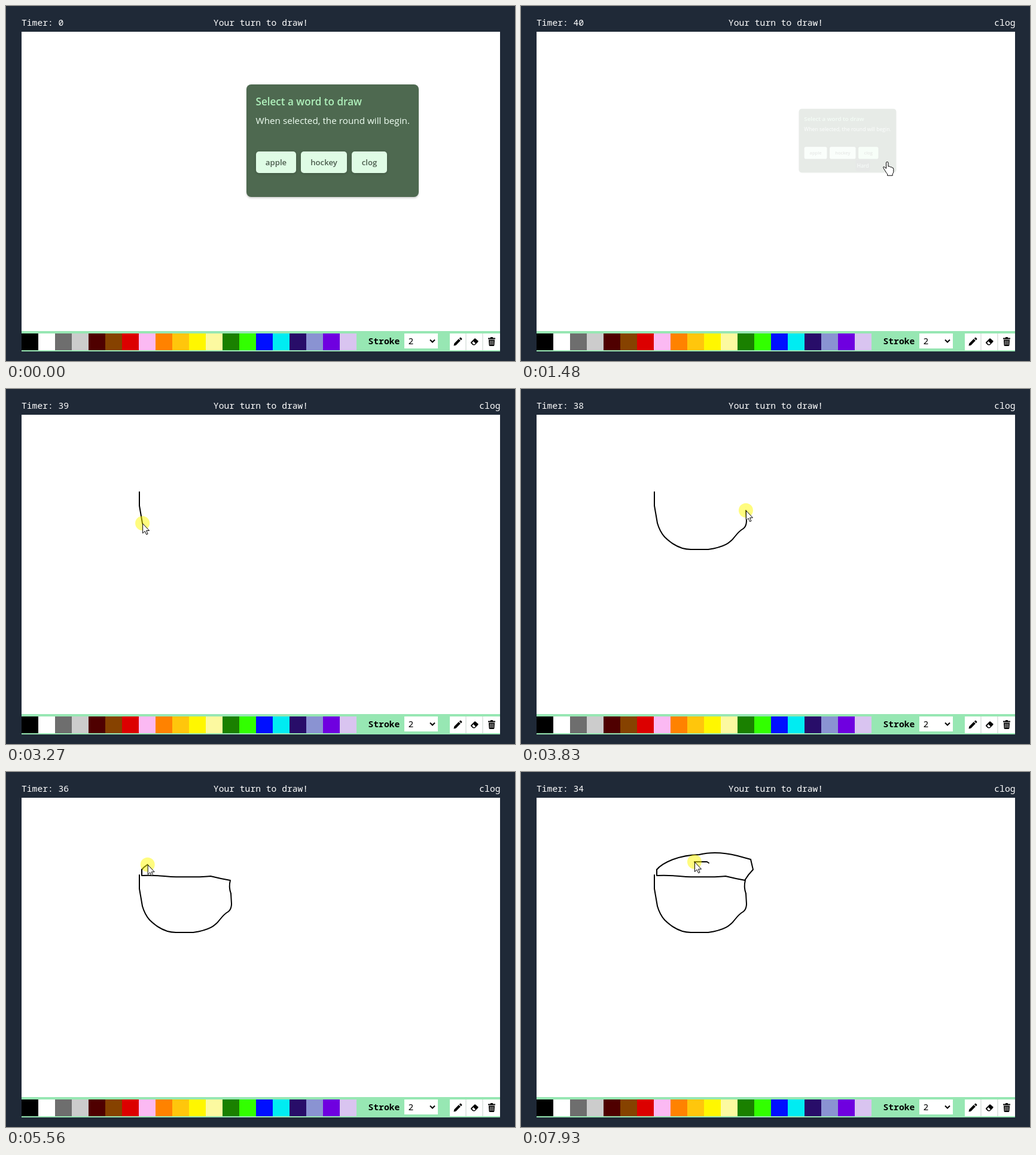
Animation, 851 px wide and 593 px high, one loop 8 s. Source, as an HTML page:

```html
<!DOCTYPE html>
<html lang="en">
<head>
<meta charset="utf-8">
<title>Drawing game</title>
<style>
  html, body { margin: 0; width: 100%; height: 100%; overflow: hidden; background: #1f2937; }
  svg { display: block; width: 851px; height: 593px; }
  text { white-space: pre; }
  .mono { font: 14.67px "Noto Sans Mono", monospace; }
  .head { fill: #fff; font-weight: 500; }
  .bold { font-weight: 700; }
  .sans { font: 15.28px "Open Sans", sans-serif; }
  .title { font-size: 17.1px; font-weight: 600; }
  .word { font-size: 13.2px; font-weight: 600; text-anchor: middle; fill: #4a5b4c; }
  .panel { filter: drop-shadow(0 2px 1.5px rgba(0, 0, 0, .18)); }
  .button { fill: #dffce5; filter: drop-shadow(0 1px 2px rgba(0, 0, 0, .2)); }
  .button.hover { fill: #c9fbcb; }
  #ink path { fill: none; stroke: #000; stroke-width: 2; stroke-linejoin: round; stroke-linecap: round; }
  .cursor { fill: #fff; stroke: #000; stroke-linejoin: round; }
</style>
</head>
<body>
<svg viewBox="0 0 851 593">
  <g class="mono head">
    <text id="timer" x="26" y="33"></text>
    <text x="426" y="33" text-anchor="middle">Your turn to draw!</text>
    <text id="answer" x="826.5" y="33" text-anchor="end">clog</text>
  </g>
  <rect x="26" y="43" width="800" height="500" fill="#fff"/>

  <rect x="26" y="543" width="800" height="34" fill="#97e7b3"/>
  <g id="swatches"></g>
  <text class="mono bold" x="605.5" y="565">Stroke</text>
  <rect x="666" y="547" width="56" height="25" fill="#fff"/>
  <text class="mono" x="672.5" y="565">2</text>
  <path d="M709 557.5l4 4 4-4" fill="none" stroke="#000" stroke-width="2"/>
  <rect x="742" y="547" width="84" height="28" fill="#fff"/>
  <path d="M769 547v28M797 547v28" stroke="#e3e8e5" stroke-width="2"/>
  <path d="M748.5 567.5l.8-3.8 7.6-7.6 3 3-7.6 7.6zM757.8 555.2l1.3-1.3q.8-.6 1.6 0l1.4 1.4q.6.8 0 1.6l-1.3 1.3z"/>
  <path d="M777.3 561.5l6-6q.8-.7 1.6 0l4.4 3.8q.8.8 0 1.6l-5.5 5.6h-3.2l-3.3-3.2q-.7-.8 0-1.8z"/>
  <path d="M779.1 562.4l2.4-2.3 3.4 3.4-1.3 1.4h-2.2z" fill="#fff"/>
  <path d="M806 554.5h3.5l1-1.5h3l1 1.5h3.5v2h-12zM807 557.5h10l-.6 9.3q-.2 1.2-1.4 1.2h-6q-1.2 0-1.4-1.2z"/>
  <path d="M809.7 559v7M812 559v7M814.3 559v7" stroke="#fff" stroke-width=".8"/>

  <g id="dialog" class="sans">
    <rect class="panel" x="402" y="131" width="288" height="188" rx="8" fill="#4e6950"/>
    <text class="title" x="417.5" y="166" fill="#aff0bb">Select a word to draw</text>
    <text x="417.5" y="197" fill="#f0fff3">When selected, the round will begin.</text>
    <g id="buttons"></g>
    <g id="tip">
      <rect y="281" height="34" rx="6" fill="#43524f"/>
      <text y="304" fill="#dcfce7"></text>
    </g>
  </g>

  <g id="ink"></g>
  <g id="pointer">
    <circle id="press" r="12" fill="#fffa00" fill-opacity=".5"/>
    <path id="arrow" class="cursor" d="M.5.5V16.6L4.1 13.1 6.6 18.7 9 17.7 6.6 12.2H11.5Z"/>
    <path id="hand" class="cursor" d="M-1.5 11.4V2a1.7 1.7 0 0 1 3.4 0V8q3-.8 3.4 1 3-.6 3.2 1.2 2.2-.2 2.2 2v4.5q0 2-1.6 4v2.5H.5v-2.5q-1.5-1.5-4-5.8-2.5-3.5-3-5.5.2-2.4 5 2z"/>
  </g>
</svg>
<script>
const LOOP = 8000, CLOSE = 1140;
const $ = id => document.getElementById(id);
const show = (el, on) => el.style.display = on ? '' : 'none';

const colors = '000 fff 6e6e6e ccc 4f0000 864200 dc0000 fbb9f3 ff8200 ffc60c fff700 fcf9a0 1a8000 32ff00 000fff 00ecf2 280d69 8a93d2 6f00e0 d9c4f0'.split(' ');
$('swatches').innerHTML = colors.map((c, i) =>
  `<rect x="${26 + 28 * i}" y="547" width="28" height="28" fill="#${c}"/>`).join('');

const words = [
  { word: 'apple', level: 'Easy', x: 418, w: 67 },
  { word: 'hockey', level: 'Medium', x: 493, w: 77 },
  { word: 'clog', level: 'Hard', x: 578, w: 59 }
];
$('buttons').innerHTML = words.map(b =>
  `<rect class="button" x="${b.x}" y="243" width="${b.w}" height="36" rx="5"/>
   <text class="word" x="${b.x + b.w / 2}" y="266">${b.word}</text>`).join('');
const buttons = document.querySelectorAll('.button');

// Each leg of the pointer's way lasts until the next one starts
const legs = [
  { start: 70, d: 'M722 440L640 330Q580 262 555 262' },
  { start: 400, d: 'M555 262L612 260' },
  { start: 560, d: 'M612 260h.1' },
  { start: 1690, d: 'M612 260L590 268' },
  { start: 1760, d: 'M590 268h.1' },
  { start: 1900, d: 'M590 268C475 305 300 280 215 374L222 172' },
  { start: 2730, d: 'M222 172h1' },
  { start: 3060, draw: true, d: 'M223 172V195L228 224' },
  { start: 3270, draw: true, d: 'M228 224Q232 238 240 247C252 259 266 268 284 268H313C340 264 350 257 358 246Q365 237 372 233 377 229 377 220L376 203' },
  { start: 3830, draw: true, d: 'M376 203Q372 192 375 181 358 178 342 174 328 176 276 175' },
  { start: 4520, draw: true, d: 'M276 175Q250 172 227 173V163' },
  { start: 5490, draw: true, d: 'M227 163C236 152 262 139 298 138Q326 131 362 140L384 146' },
  { start: 6400, draw: true, d: 'M384 146L388 163Q380 171 374 181' },
  { start: 7200, d: 'M374 181Q340 325 316 165L314 152' },
  { start: 7800, draw: true, d: 'M314 152l-3-2H290' },
  { start: 7930, draw: true, d: 'M290 150h.1' }
];
legs.forEach((leg, i) => {
  leg.end = i + 1 < legs.length ? legs[i + 1].start : LOOP;
  leg.path = document.createElementNS('http://www.w3.org/2000/svg', 'path');
  leg.path.setAttribute('d', leg.d);
  leg.length = leg.path.getTotalLength();
  if (leg.draw) $('ink').append(leg.path);
});

const clamp = x => Math.min(1, Math.max(0, x));
const reached = (leg, t) => leg.length * clamp((t - leg.start) / (leg.end - leg.start));

function drawDialog(t, hover) {
  const x = clamp((t - CLOSE - 10) / 428), p = x * x * (3 - 2 * x);
  show($('dialog'), p < 1);
  $('dialog').setAttribute('opacity', 1 - p);
  $('dialog').setAttribute('transform', `translate(546 225) scale(${1 - p / 2}) translate(-546 -225)`);
  buttons.forEach((b, i) => b.classList.toggle('hover', words[i] === hover));
  show($('tip'), hover);
  if (!hover) return;
  const [box, label] = $('tip').children;
  label.textContent = hover.level;
  label.setAttribute('x', hover.x - 4);
  box.setAttribute('x', hover.x - 8);
  box.setAttribute('width', label.getComputedTextLength() + 7);
}

function render(t) {
  const ticks = Math.max(0, Math.floor((t - 2460) / 1030) + 1);
  $('timer').textContent = 'Timer: ' + (t < CLOSE ? 0 : 40 - ticks);
  show($('answer'), t >= CLOSE);

  let active = legs[0];
  for (const leg of legs) {
    const started = t >= leg.start;
    if (started) active = leg;
    show(leg.path, started);
    leg.path.setAttribute('stroke-dasharray', `${reached(leg, t)} ${leg.length + 1}`);
  }

  const { x, y } = active.path.getPointAtLength(reached(active, t));
  const hover = t < 1690 && words.find(b => x >= b.x && x <= b.x + b.w && y >= 243 && y <= 279);
  drawDialog(t, hover);

  show($('pointer'), t >= 70);
  $('pointer').setAttribute('transform', `translate(${x} ${y})`);
  show($('press'), active.draw);
  show($('hand'), hover);
  show($('arrow'), !hover);
}

const start = performance.now();
function frame() {
  render((performance.now() - start) % LOOP);
  requestAnimationFrame(frame);
}
frame();
</script>
</body>
</html>
```
